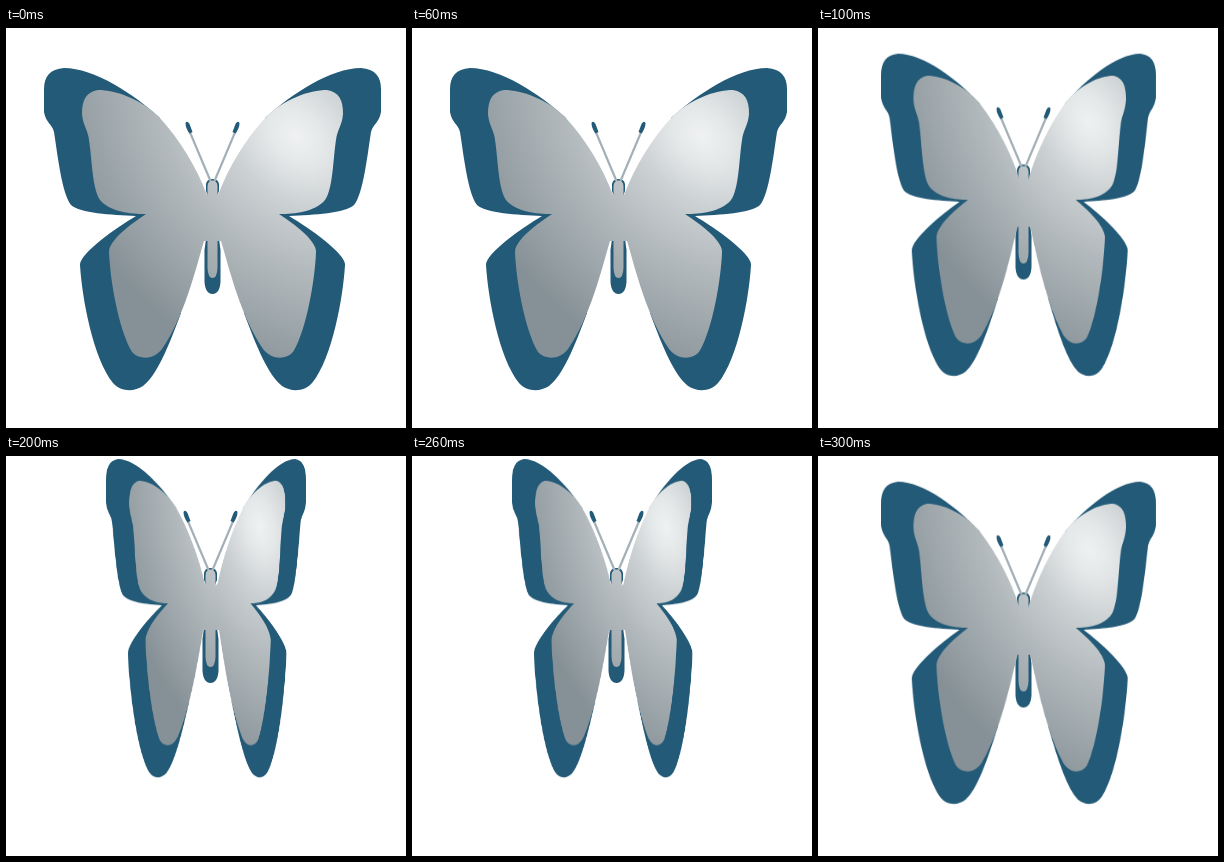
These frames come from a looping animation (400 px wide and 400 px high, 0.4 s). An HTML page:

```html
<!DOCTYPE html>
<html lang="en">
<head>
<meta charset="utf-8">
<title>Butterfly</title>
<style>
  html, body { margin: 0; width: 100%; height: 100%; overflow: hidden; background: #fff; }
  svg { display: block; width: 100%; height: 100%; }
  .blue { fill: #235a78; }
  .left, .right, .body { animation: 400ms step-end infinite; }
  .left { animation-name: flap-left; }
  .right { animation-name: flap-right; }
  .body { animation-name: lift; }

  /* Each wing folds towards the body in held poses: open, half, closed, half. */
  @keyframes flap-left {
    0% { transform: none; }
    25%, 75% { transform: matrix(.853, 0, 0, 1, 30.6, -14.3); }
    50% { transform: matrix(.608, 0, 0, .988, 76.9, -36.5); }
  }
  @keyframes flap-right {
    0% { transform: none; }
    25%, 75% { transform: matrix(.786, 0, 0, 1, 43.2, -14.3); }
    50% { transform: matrix(.544, 0, 0, .988, 96, -36.5); }
  }
  @keyframes lift {
    0% { transform: none; }
    25%, 75% { transform: translate(-1px, -14.5px); }
    50% { transform: translate(-2px, -39px); }
  }
</style>
</head>
<body>
<svg viewBox="0 0 400 400">
  <defs>
    <radialGradient id="sheen" gradientUnits="userSpaceOnUse" cx="0" cy="0" r="235"
        gradientTransform="translate(290 108) rotate(45) scale(1.35 1)">
      <stop offset="0" stop-color="#eff1f2"/>
      <stop offset=".1" stop-color="#e5e8e9"/>
      <stop offset=".25" stop-color="#cdd2d4"/>
      <stop offset=".5" stop-color="#b2b9bc"/>
      <stop offset=".95" stop-color="#869197"/>
    </radialGradient>
    <radialGradient id="sheen-mirrored" href="#sheen"
        gradientTransform="translate(123 108) scale(-1 1) rotate(45) scale(1.35 1)"/>
    <g id="wing">
      <path class="blue" d="M154 90 C128 66 88 40 58 40 C44 41 38 48 38 62 V84 C40 95 46 96 48 104
        C52 130 56 165 65 177 C74 185 105 187 130 188 C110 200 74 225 74 237
        C76 270 87 330 107 355 C115 364 128 364 137 358 C151 347 162 320 175 285 L140 250 L150 186 Z"/>
      <path d="M201 167 C190 138 174 112 154 90 C135 71 110 62 92 62 C80 64 76 72 76 86
        C77 98 82 102 83 112 C86 130 86 160 94 172 C104 184 125 186 140 186
        C125 196 103 212 103 224 C104 250 112 300 126 324 C133 332 148 332 156 321
        C178 290 190 240 198 213 H207 V168 Z"/>
    </g>
    <g id="antenna">
      <path d="M204.500 153 L183 102" fill="none" stroke="#a3b0b7" stroke-width="2.200"/>
      <path class="blue" d="M179.500 95 Q181 92 183.500 96 L186.500 104 L183.500 105.500 Q179.500 100 179.500 95 Z"/>
    </g>
  </defs>

  <g class="body">
    <path class="blue" d="M200 211 H213 L214.500 222 V254 C214 262 211 266 206.500 266 C202 266 199 262 198.500 254 V222 Z"/>
    <path class="blue" d="M200 163 V156 Q201 151 206.500 151 Q212 151 213 156 V163 L211 168 H202 Z"/>
    <use href="#antenna"/>
    <use href="#antenna" transform="translate(413) scale(-1 1)"/>
  </g>
  <g class="left"><use href="#wing" fill="url(#sheen)"/></g>
  <g class="right">
    <use href="#wing" fill="url(#sheen-mirrored)" transform="translate(413) scale(-1 1)"/>
  </g>
  <path class="body" fill="url(#sheen)" d="M201.500 215 V158 Q202 152.500 206.500 152.500 Q211 152.500 211.500 158
    V240 Q211 250 206.500 250 Q202 250 201.500 240 Z"/>
</svg>
</body>
</html>
```
